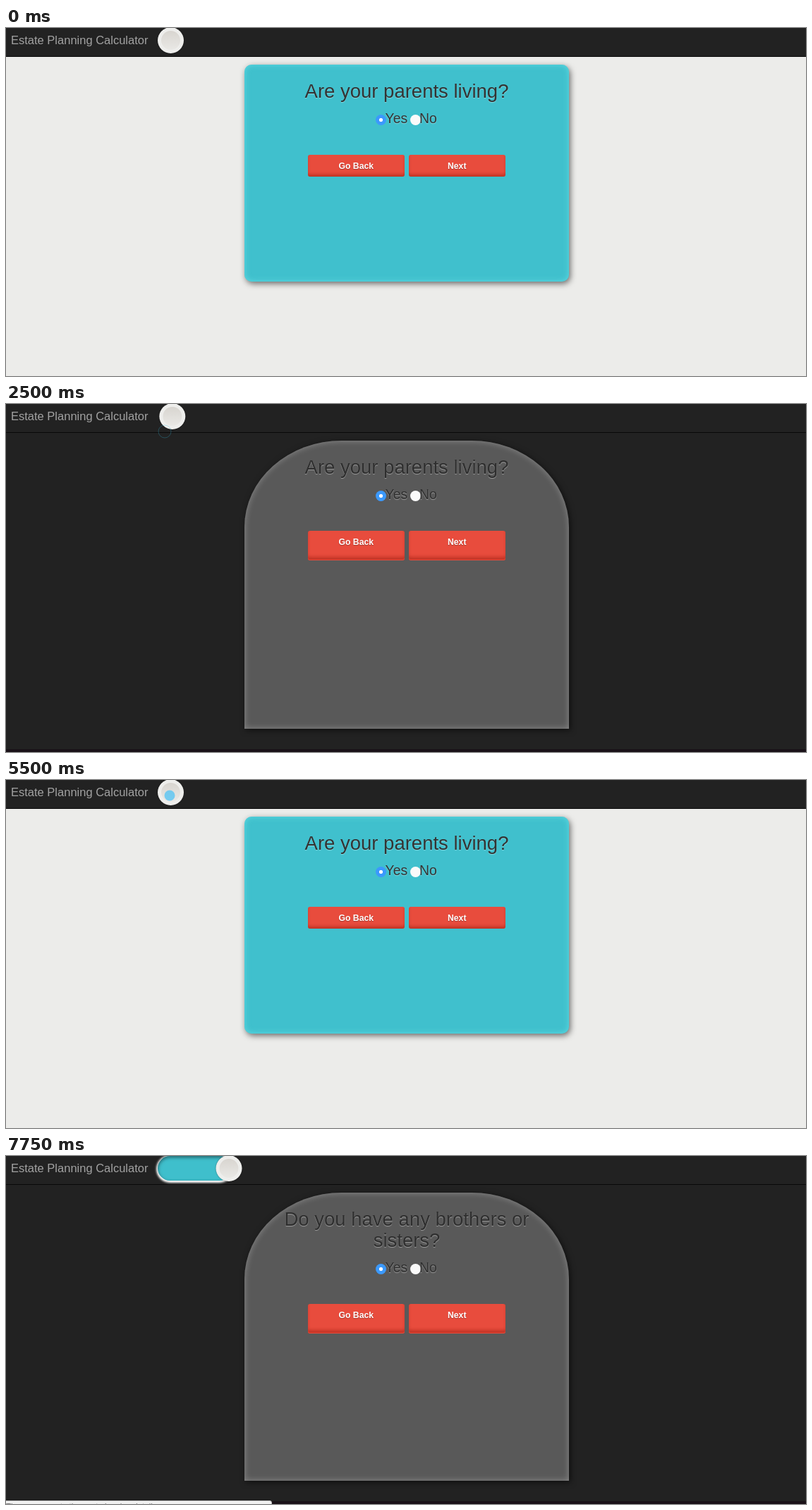
Animation, 1134 px wide and 494 px high, one loop 8 s. Source, as an HTML page:

```html
<!DOCTYPE html>
<html lang="en">
<head>
<meta charset="utf-8">
<title>Estate Planning Calculator</title>
<style>
  html, body { margin: 0; width: 100%; height: 100%; overflow: hidden; }
  body { font-family: "Liberation Sans", Arial, sans-serif; }
  #stage, #stage * { position: absolute; box-sizing: border-box; }
  #stage { width: 1134px; height: 494px; overflow: hidden; background: #ececea; }
  #stage.dark { background: #222; }

  .nav { left: 0; top: 0; width: 100%; height: 41px; background: #222; border-bottom: 1px solid #080808; }
  .brand { left: 7px; top: 7.3px; font-size: 16.5px; line-height: 20px; color: #a2a2a2; white-space: nowrap; }

  .track {
    left: 215px; top: 0; height: 35px; border-radius: 18px;
    background: linear-gradient(#0090e4, #00adff 55%);
    box-shadow: 0 1px 3px 2px #fff, inset 0 2px 5px rgba(0, 0, 0, .5);
  }
  .dark .track { background: #3fbfcc; }
  .knob {
    left: 215px; top: -1px; width: 37px; height: 37px; border-radius: 50%;
    background: #eeeeec; box-shadow: 0 0 2px rgba(0, 0, 0, .45);
  }
  .knob::after {
    content: ""; position: absolute; inset: 5px; border-radius: 50%;
    background: linear-gradient(#d8d5d0, #e9e8e5);
  }

  .card {
    left: 338px; top: 52px; width: 460px; height: 308px; border-radius: 10px;
    background: #40c0cd;
    box-shadow: 2px 3px 9px rgba(0, 0, 0, .55), inset 0 0 9px rgba(100, 225, 232, .8);
  }
  .dark .card {
    height: 409px; border-radius: 30% 30% 0 0; background: #595959;
    box-shadow: 2px 2px 9px rgba(0, 0, 0, .6), inset 0 0 10px rgba(255, 255, 255, .3);
  }

  .ask, .form { color: #333; text-shadow: 0 1px 1px rgba(255, 255, 255, .35); }
  .dark .ask, .dark .form { color: #2e2e2e; text-shadow: 0 1px 1px rgba(255, 255, 255, .42); }
  .ask { left: 368px; top: 75px; width: 400px; font-size: 27.5px; line-height: 30px; text-align: center; }
  .form { left: 0; top: 0; font-size: 19.4px; line-height: 30px; }
  .form span { top: 113.3px; }
  .radio { top: 123px; width: 15px; height: 15px; border-radius: 50%; background: #fafafa; }
  .radio.on { background: radial-gradient(circle, #fff 2.2px, #3b99fc 3px); }
  .btn {
    top: 180px; width: 137.5px; height: 31px; border-radius: 3px; background: #e84c3d;
    box-shadow: inset 0 -4px 4px -1px rgba(150, 25, 10, .5);
    color: #fff; font-size: 12.2px; font-weight: bold; line-height: 33px; text-align: center;
    text-shadow: 0 1px 1px rgba(0, 0, 0, .3);
  }
  .dark .btn { height: 41.5px; box-shadow: inset 0 -1px 0 #e84c3d, inset 0 -6px 4px -1px rgba(150, 25, 10, .45); }

  .foot { left: 0; top: 490px; width: 100%; height: 4px; background: #1a1218; display: none; }
  .dark .foot { display: block; }
  .status {
    left: -1px; top: 489px; width: 378px; height: 22px; border-radius: 0 3px 0 0;
    border: 1px solid #bbb; background: #f1f1f1; color: #777;
    font-size: 11.5px; line-height: 15px; white-space: nowrap;
  }

  .dot, .ring { border-radius: 50%; transform: translate(-50%, -50%); }
  .dot { width: 15px; height: 15px; background: rgba(84, 196, 243, .78); }
  .ring { width: 19px; height: 19px; border: 1px solid rgba(50, 180, 215, .6); }
</style>
</head>
<body>
<div id="stage">
  <div class="nav"></div>
  <div class="brand">Estate Planning Calculator</div>
  <div class="card"></div>
  <div class="ask"></div>
  <div class="form">
    <div class="radio on" style="left:524px"></div><span style="left:537.5px">Yes</span>
    <div class="radio" style="left:573px"></div><span style="left:586px">No</span>
    <div class="btn" style="left:427.5px">Go Back</div>
    <div class="btn" style="left:570.5px">Next</div>
  </div>
  <div class="foot"></div>
  <div class="status">Then move on to the next planning detail</div>
  <div class="track"></div>
  <div class="knob"></div>
  <div class="dot"></div>
  <div class="ring"></div>
</div>
<script>
  const LOOP = 8000, STEP = 250, TRAVEL = 82.5;
  const stage = document.getElementById("stage");
  const el = name => stage.querySelector("." + name);
  const [ask, form, status, track, knob, dot, ring] =
    ["ask", "form", "status", "track", "knob", "dot", "ring"].map(el);

  // Each press shows a dot for one step, then a fading ring.
  const presses = [
    { at: 2000, dot: [229, 21], ring: [225, 39] },
    { at: 3750, dot: [305, 28], ring: [300.5, 47] },
    { at: 5500, dot: [231.5, 21.5], ring: [228, 40] },
    { at: 7000, dot: [640, 205], ring: [636, 223] }
  ];
  const clamp = x => Math.min(1, Math.max(0, x));
  const ease = x => x * x * (3 - 2 * x);
  const slide = (t, from) => ease(clamp((t - from) / 1000));
  const show = (node, on) => { node.style.display = on ? "" : "none"; };

  function place(node, pos, alpha) {
    show(node, pos);
    if (!pos) return;
    node.style.left = pos[0] + "px";
    node.style.top = pos[1] + "px";
    node.style.opacity = alpha;
  }

  function drawPointer(t) {
    const press = presses.find(p => t >= p.at && t < p.at + 3 * STEP);
    const age = press ? t - press.at : 0;
    place(dot, press && age < STEP ? press.dot : null, 1);
    if (press && age >= STEP) place(ring, press.ring, age < 2 * STEP ? 1 : .5);
    else if (t >= 750 && t < 2000) {
      place(ring, [282 - 57 * ease((t - 750) / 1000), 40], .6);
    } else place(ring, null);
  }

  function draw(time) {
    const t = Math.floor(time / STEP) * STEP;
    const dark = (t >= 2500 && t < 4000) || t >= 5750;
    const pos = slide(t, 2400) - slide(t, 3900) + slide(t, 5650);
    const second = t >= 7250;

    stage.className = dark ? "dark" : "";
    knob.style.transform = `translateX(${pos * TRAVEL}px)`;
    track.style.width = 22 + pos * TRAVEL + "px";
    track.style.opacity = clamp((pos - .04) * 6);

    const text = second ? "Do you have any brothers or sisters?" : "Are your parents living?";
    if (ask.textContent !== text) ask.textContent = text;
    form.style.top = second ? "30px" : "0";
    show(status, t >= 7000);
    drawPointer(t);
  }

  const start = performance.now();
  function tick() {
    draw((performance.now() - start) % LOOP);
    requestAnimationFrame(tick);
  }
  tick();
</script>
</body>
</html>
```
